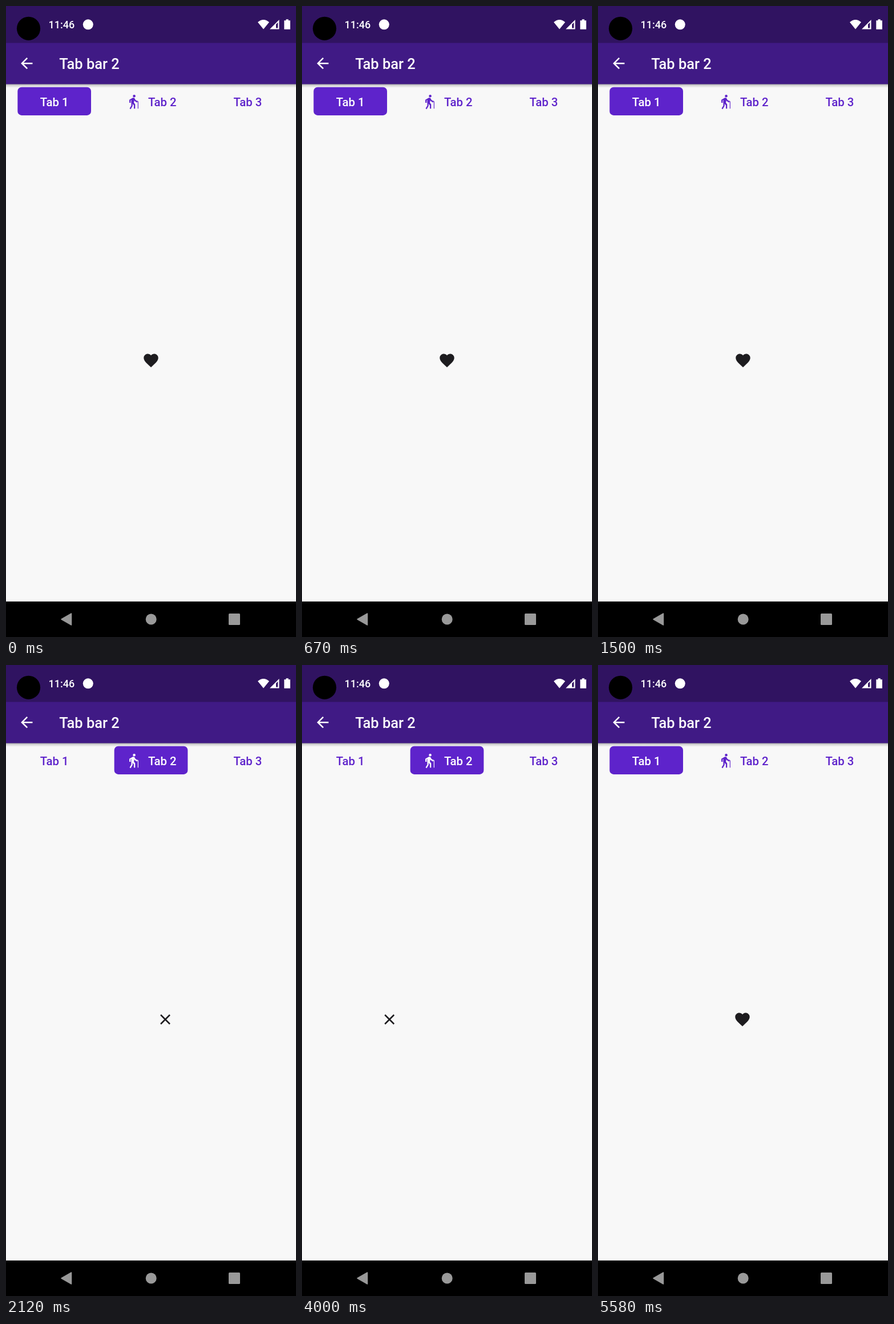
Write an HTML page that moves like this. It is 508x1102 px and loops after 5.62 s.

```html
<!DOCTYPE html>
<html lang="en">
<head>
<meta charset="utf-8">
<title>Tab bar</title>
<style>
  html, body { margin: 0; width: 100%; height: 100%; overflow: hidden; background: #f8f8f8; }
  svg { display: block; width: 100%; height: 100%; }
  text { font-family: Roboto, sans-serif; font-weight: 500; }
  .tab text { font-size: 20.32px; text-anchor: middle; }
  .line { fill: none; stroke-width: 2; }
</style>
</head>
<body>
<svg viewBox="0 0 508 1102" preserveAspectRatio="none">
  <defs>
    <linearGradient id="shade" x2="0" y2="1">
      <stop offset="0" stop-color="#000" stop-opacity=".36"/>
      <stop offset=".4" stop-color="#000" stop-opacity=".14"/>
      <stop offset="1" stop-color="#000" stop-opacity="0"/>
    </linearGradient>
  </defs>
  <rect width="508" height="1102" fill="#f8f8f8"/>

  <!-- Icons use a 24-unit grid centred on 0,0 -->
  <g id="pages" fill="#1d1c1f" stroke="none">
    <path transform="translate(254 619) scale(1.27)" d="M0 9.4L-1.5 8C-6.6 3.4-10 .3-10-3.5C-10-9-3-11 0-6.9C3-11 10-9 10-3.5C10 .3 6.600 3.400 1.500 8Z"/>
    <path class="line" stroke="#1d1c1f" transform="translate(762 619) scale(1.27)" d="M-6.300-6.300L6.300 6.300M6.300-6.300L-6.300 6.300"/>
    <circle cx="1270" cy="619" r="9.500"/>
  </g>

  <rect y="136" width="508" height="7" fill="url(#shade)"/>
  <rect width="508" height="65" fill="#301361"/>
  <rect y="64.500" width="508" height="72" fill="#401a85"/>

  <g fill="#fff">
    <text x="74.500" y="39" font-size="18">11:46</text>
    <circle cx="143.800" cy="32.300" r="9"/>
    <path d="M441 28.300Q451 19.700 461 28.300L451 40.500Z"/>
    <path fill-rule="evenodd" d="M462 40.500L478.500 24V40.500ZM473 32V38.500H476.300V28.800Z"/>
    <path d="M490.500 23.300h4.200v2h3.200v15.400h-10.600v-15.400h3.200z"/>
    <path class="line" stroke="#fff" transform="translate(36.300 100.200) scale(1.27)" d="M8 0H-6.500M.7-7.300L-6.600 0L.7 7.300"/>
    <text x="93.200" y="110" font-size="25.400">Tab bar 2</text>
  </g>
  <circle cx="39.500" cy="39.300" r="20.600"/>

  <g class="tab"><rect/><text x="84.670" y="175">Tab 1</text></g>
  <g class="tab"><rect/><text x="273.800" y="175">Tab 2</text>
    <g transform="translate(209.300 153.200) scale(1.130)">
      <circle cx="13.500" cy="3.500" r="2" stroke="none"/>
      <path stroke="none" d="M9 10L11.500 6.200Q13.600 6 14.200 7.300L13 13.700L15 16.500V23H13V18L9 13Z"/>
      <path class="line" d="M7 14V9.900L12 7M10 12.500V18.600L7.200 23.400M13.200 7.500Q14.500 11.800 18.500 12"/>
      <path class="line" style="stroke-width:1" d="M17.500 13.500V12.500a1 1 0 0 1 2 0V23"/>
    </g>
  </g>
  <g class="tab"><rect/><text x="423.330" y="175">Tab 3</text></g>

  <rect y="1040" width="508" height="62"/>
  <g fill="#999">
    <path d="M97 1071L114.500 1061V1081Z" stroke="#999" stroke-width="1.500" stroke-linejoin="round"/>
    <circle cx="254.200" cy="1071" r="9.500"/>
    <rect x="390" y="1061" width="20" height="20" rx="1.500"/>
  </g>
</svg>
<script>
const LOOP = 5620, WIDTH = 508, FPS = 24, MARGIN = 20.32;
const VIOLET = [94, 35, 203], WHITE = [255, 255, 255];

// Each swipe slows to a stop "gap" px short of its page, then snaps home at "settle".
const swipes = [
  { start: 1710, stop: 2120, settle: 2290, dir: 1, gap: 25 },
  { start: 2500, stop: 2910, settle: 3370, dir: 1, gap: 15.5 },
  { start: 3700, stop: 4241, settle: 4241, dir: -1, gap: 0 },
  { start: 4830, stop: 5250, settle: LOOP + 40, dir: -1, gap: 1 }
];

const clamp = v => Math.min(1, Math.max(0, v));
const mix = (a, b, k) => a + (b - a) * k;
const easeOut = k => 1 - (1 - k) ** 2;
const pages = document.getElementById('pages');
const tabs = [...document.querySelectorAll('.tab')];

tabs.forEach((tab, i) => {
  const slot = WIDTH / tabs.length;
  const box = {
    x: i * slot + MARGIN, y: 141.7, width: slot - 2 * MARGIN, height: 49.2,
    rx: 7, fill: `rgb(${VIOLET})`, stroke: 'none'
  };
  for (const key in box) tab.firstElementChild.setAttribute(key, box[key]);
});

function travel(swipe, t) {
  if (t >= swipe.settle) return swipe.dir * WIDTH;
  const k = clamp((t - swipe.start) / (swipe.stop - swipe.start));
  return swipe.dir * (WIDTH - swipe.gap) * easeOut(k);
}

function draw(time) {
  const t = Math.floor((time % LOOP + 6) * FPS / 1000) * 1000 / FPS;
  const x = swipes.reduce((sum, swipe) => sum + travel(swipe, t), 0);
  pages.setAttribute('transform', `translate(${-x} 0)`);
  tabs.forEach((tab, i) => {
    const on = clamp((0.6 - Math.abs(x / WIDTH - i)) / 0.2);
    const color = `rgb(${VIOLET.map((c, n) => Math.round(mix(c, WHITE[n], on)))})`;
    tab.firstElementChild.setAttribute('opacity', on);
    tab.setAttribute('fill', color);
    tab.setAttribute('stroke', color);
    tab.querySelector('text').setAttribute('stroke', 'none');
  });
}

const start = performance.now();
function tick() {
  draw(performance.now() - start);
  requestAnimationFrame(tick);
}
tick();
</script>
</body>
</html>
```
